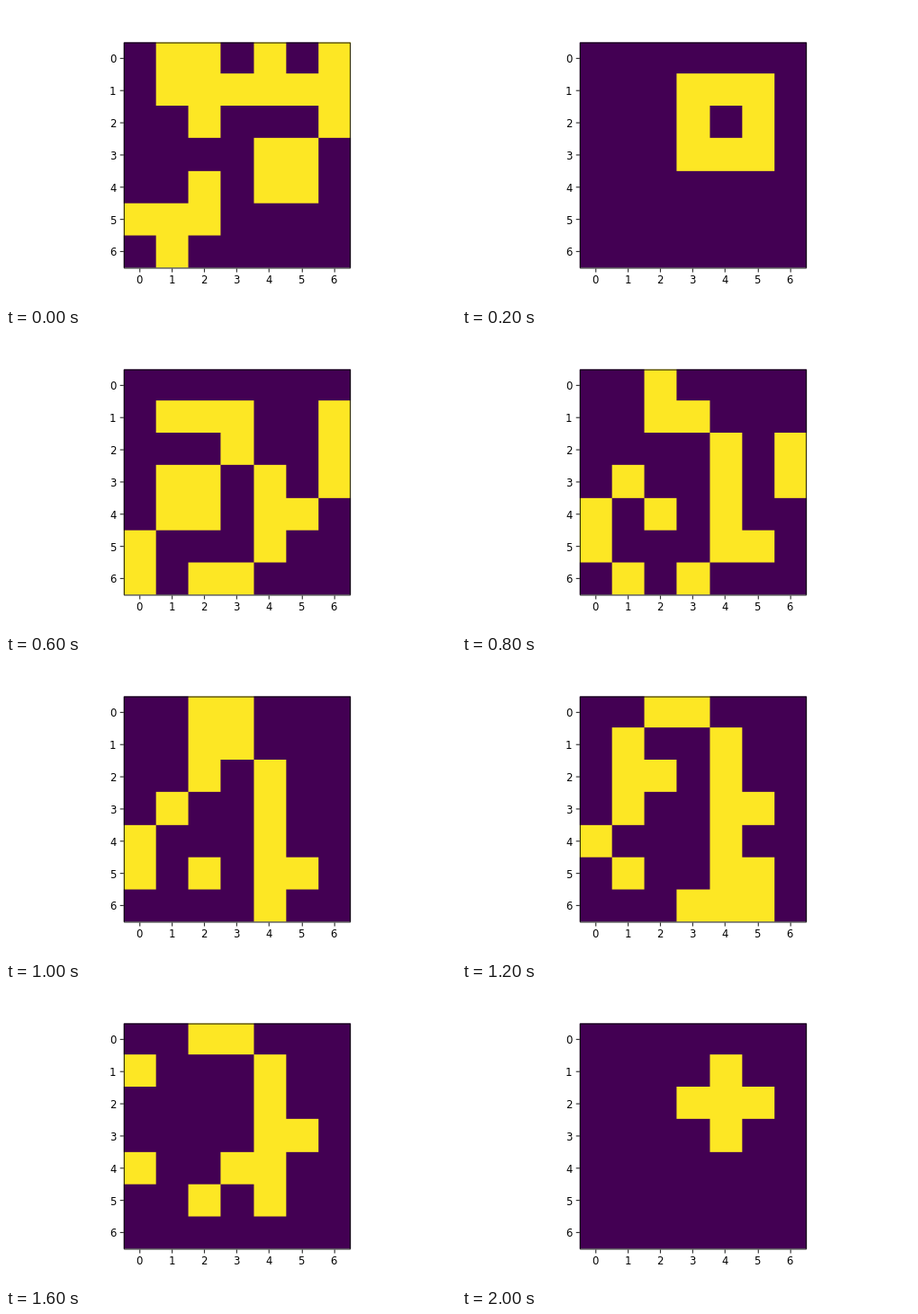
These frames come from a looping animation (500x333 px, 2.2 s). A matplotlib script:

```python
import numpy as np
import matplotlib.pyplot as plt
from matplotlib.animation import FuncAnimation
from matplotlib.patches import Rectangle

W, H, DPI = 500, 333, 100
UW, UH = 432, 288          # layout units of the plot
SCALE = W / UW
N, STEPS = 7, 10
PT = 72 / DPI
DARK = np.array([68, 1, 84]) / 255
BRIGHT = np.array([253, 231, 37]) / 255

START = ["0110101",
         "0111111",
         "0010001",
         "0000110",
         "0010110",
         "1110000",
         "0100000"]


def evolve(grid):
    """One Game of Life step with dead borders."""
    p = np.pad(grid, 1)
    near = sum(p[i:i + N, j:j + N] for i in range(3) for j in range(3)) - grid
    return ((near == 3) | ((near == 2) & (grid == 1))).astype(int)


def coverage(edges, size):
    """Share of each pixel that every cell band covers."""
    pix = np.arange(size)[:, None]
    span = np.minimum(pix + 1, edges[1:]) - np.maximum(pix, edges[:-1])
    return np.clip(span, 0, 1)


gens = [np.array([[int(c) for c in row] for row in START])]
for _ in range(STEPS):
    gens.append(evolve(gens[-1]))

# Generations play in name order, so the last one comes second.
order = [0, STEPS] + list(range(1, STEPS))

x_edges = np.round(np.linspace(113, 331, N + 1))
y_edges = np.round(np.linspace(34, 252, N + 1))
y_edges[0] = 35
cols = coverage(x_edges * W / UW, W).T
rows = coverage(y_edges * H / UH, H)
area = (rows @ np.ones((N, N)) @ cols)[..., None]


def picture(grid):
    alive = (rows @ grid @ cols)[..., None]
    return np.clip(1 + area * (DARK - 1) + alive * (BRIGHT - DARK), 0, 1)


fig = plt.figure(figsize=(W / DPI, H / DPI), dpi=DPI, facecolor="white")
ax = fig.add_axes([0, 0, 1, 1])
ax.axis("off")
image = ax.imshow(picture(gens[0]), extent=(0, UW, UH, 0), aspect="auto",
                  interpolation="nearest")
ax.set_xlim(0, UW)
ax.set_ylim(UH, 0)

ax.add_patch(Rectangle((113.5, 35.5), 217, 217, fill=False, ec="black",
                       alpha=0.8, lw=SCALE * PT, joinstyle="miter",
                       snap=False, zorder=3))


def tick(xs, ys):
    ax.plot(xs, ys, color="black", alpha=0.8, lw=SCALE * PT,
            solid_capstyle="butt", snap=False)


font = dict(family="DejaVu Sans", size=10 * SCALE * PT, color="black")
for k in range(N):
    x = 112.68 + 217.44 * (k + 0.5) / N
    y = 34.56 + 217.44 * (k + 0.5) / N
    tx, ty = round(x) + 0.5, round(y) + 0.5
    tick([tx, tx], [253, 256.5])
    tick([109.5, 113], [ty, ty])
    ax.text(x, 259, str(k), ha="center", va="top", **font)
    ax.text(105.7, y, str(k), ha="right", va="center_baseline", **font)


def update(i):
    image.set_data(picture(gens[order[i]]))
    return [image]


anim = FuncAnimation(fig, update, frames=len(order), interval=200,
                     repeat=True, repeat_delay=0, blit=False)
plt.show()
```
